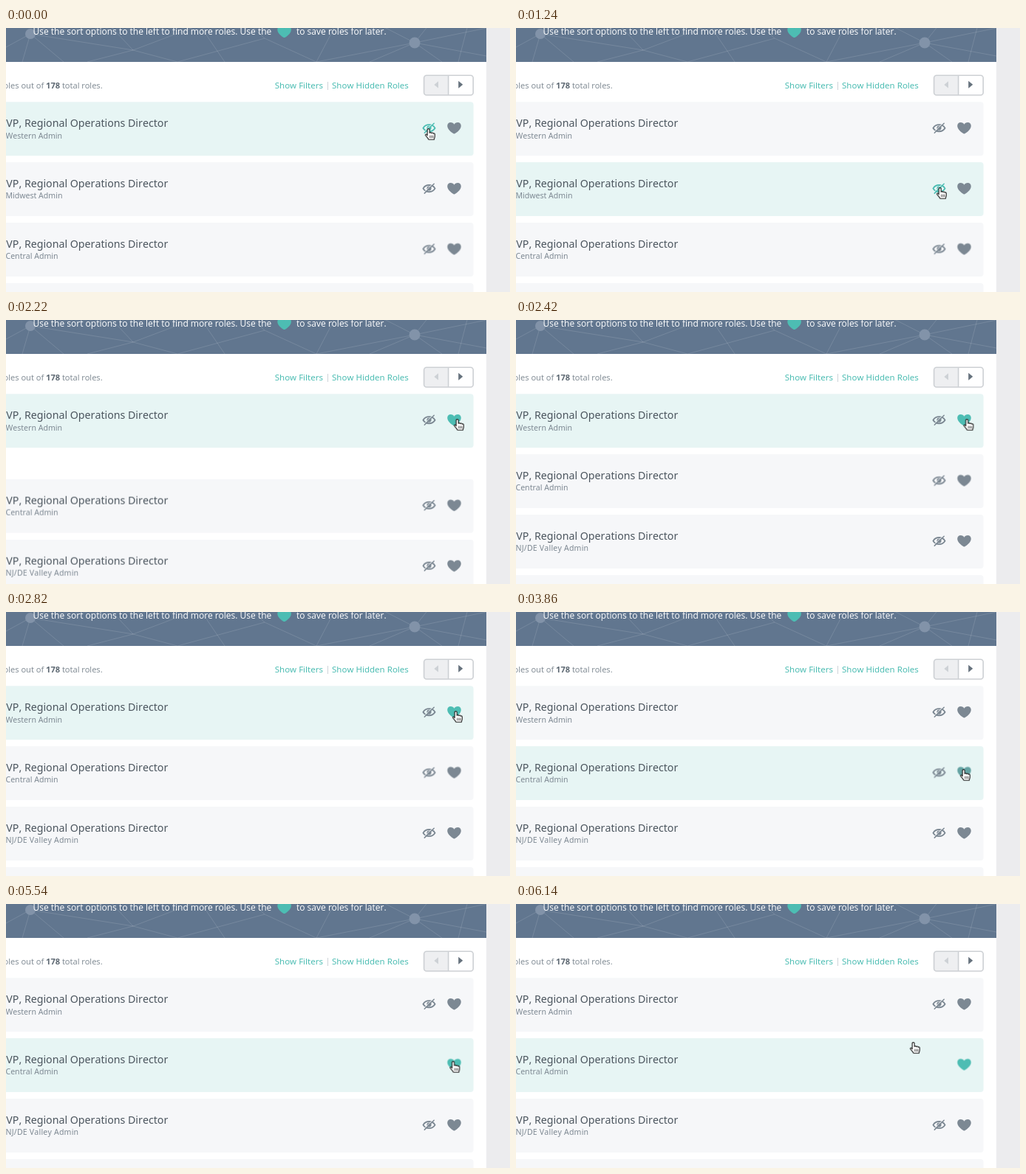
Animation of 682 by 358 pixels, one loop 6160 ms. Source, as an HTML page:

```html
<!DOCTYPE html>
<html lang="en">
<head>
<meta charset="utf-8">
<title>Role list</title>
<style>
:root { --teal: #4dbdb3; --gray: #7c8893; --row: #f6f7f9; --lit: #e7f5f4; }
html, body { margin: 0; width: 100%; height: 100%; overflow: hidden; background: #fff; }
svg { display: block; width: 682px; height: 358px; }

text { font-family: "Noto Sans", "Open Sans", sans-serif; font-kerning: none; }
.intro { font: 12.03px "Open Sans", sans-serif; fill: #fff; }
.count { font: 11.1px "Open Sans", sans-serif; fill: #7c8790; }
.count tspan { font-weight: 700; fill: #5d6872; }
.link { font-size: 11.52px; fill: var(--teal); }
.title { font-size: 14.2px; fill: #4b555e; }
.sub { font-size: 10.55px; fill: #7e8993; }
.card { fill: var(--row); }
.icon { color: var(--gray); }

.anim { animation: 6160ms ease-in-out infinite; }
.cursor { animation-name: cursor; }
.west-card { animation-name: west-card; }
.west-eye { animation-name: west-eye; }
.west-heart { animation-name: west-heart; }
.mid { animation-name: mid; }
.mid-card { animation-name: mid-card; }
.mid-eye { animation-name: mid-eye; }
.below { animation-name: below; }
.central-card { animation-name: central-card; }
.central-eye { animation-name: central-eye; }
.central-heart { animation-name: central-heart; }

@keyframes cursor {
  0%, 4.06% { transform: translate(571px, 138px); }
  14.61%, 25.32% { transform: translate(573px, 218px); }
  29.87% { transform: translate(603px, 131px); }
  33.77% { transform: translate(611px, 135px); }
  36.04% { transform: translate(610px, 136px); }
  45.78%, 53.57% { transform: translate(608px, 136px); }
  62.66%, 89.29% { transform: translate(605px, 215px); }
  99.68%, 100% { transform: translate(537px, 189px); }
}
@keyframes west-card {
  0%, 8.93% { fill: var(--lit); }
  10.88%, 27.68% { fill: var(--row); }
  29.63%, 57.87% { fill: var(--lit); }
  59.82%, 100% { fill: var(--row); }
}
@keyframes west-eye {
  0%, 6.17% { color: var(--teal); }
  8.12%, 100% { color: var(--gray); }
}
@keyframes west-heart {
  0%, 29.06% { color: var(--gray); }
  31.82%, 55.52% { color: var(--teal); }
  57.79%, 100% { color: var(--gray); }
}
@keyframes mid {
  0%, 26.95% { opacity: 1; }
  33.44%, 100% { opacity: 0; }
}
@keyframes mid-card {
  0%, 9.66% { fill: var(--row); }
  11.61%, 27.44% { fill: var(--lit); }
  30.84%, 100% { fill: var(--row); }
}
@keyframes mid-eye {
  0%, 12.34% { color: var(--gray); }
  14.29%, 100% { color: var(--teal); }
}
@keyframes below {
  0%, 32.47% { transform: none; }
  38.96%, 100% { transform: translateY(-82px); }
}
@keyframes central-card {
  0%, 58.6% { fill: var(--row); }
  60.55%, 100% { fill: var(--lit); }
}
@keyframes central-eye {
  0%, 78.57% { transform: scale(1); opacity: 1; }
  79.55% { transform: scale(.86); opacity: .95; }
  82.14%, 100% { transform: scale(0); opacity: 0; }
}
@keyframes central-heart {
  0%, 61.69% { color: var(--gray); transform: scale(1); }
  63.64%, 77.6% { color: var(--teal); transform: scale(1); }
  79.55% { color: var(--teal); transform: scale(1.2); }
  81.49% { color: var(--teal); transform: scale(1.36); }
  86.04%, 100% { color: var(--teal); transform: scale(1); }
}
</style>
</head>
<body>
<svg viewBox="0 0 682 358">
  <defs>
    <path id="heart" fill="currentColor" d="M0 7.9C-1.2 7.9-9.3 2.6-9.3-2.8C-9.3-5.8-7.3-7.5-4.8-7.5C-2.6-7.5-.9-6.4 0-4.8C.9-6.4 2.6-7.5 4.8-7.5C7.3-7.5 9.3-5.8 9.3-2.8C9.3 2.6 1.2 7.9 0 7.9Z"/>
    <mask id="cut" maskUnits="userSpaceOnUse" x="-11" y="-10" width="22" height="20">
      <path fill="#fff" d="M-11-10h22v20h-22z"/>
      <path stroke="#000" stroke-width="1" d="M-7 5.6 5.8-7.2"/>
    </mask>
    <g id="eye" fill="none" stroke="currentColor" stroke-linecap="round">
      <g mask="url(#cut)">
        <path stroke-width="1.9" d="M-8 .2C-4.5-5.9 4.5-5.9 8 .2C4.5 6.3-4.5 6.3-8 .2Z"/>
        <circle cy=".1" r="3.1" fill="currentColor" stroke="none"/>
      </g>
      <path stroke-width="1.5" d="M-6.2 6.7 6.7-6.2"/>
    </g>
    <rect id="card" x="-8" width="640.6" height="73" rx="4"/>
  </defs>

  <rect width="682" height="358" fill="#fff"/>
  <rect x="650" width="32" height="358" fill="#ececee"/>

  <rect width="650" height="46" fill="#61768f"/>
  <svg width="650" height="46">
    <g fill="none" stroke="#fff" stroke-opacity=".13">
      <path d="M33 8 0 26M33 8 78 46M33 8 22 46M33 8 62-4M33 8 172 30 262-4M110 46 172 30 232 46M172 30 140-4"/>
      <path d="M262-4 296 46M232 46 350 14 420 46M350 14 330-4M420 46 446-4M420 46 553 20"/>
      <path d="M553 20 506-4M553 20 492 46M553 20 572-4M553 20 590 46M553 20 650 0M553 20 650 38M625-4 612 46"/>
    </g>
    <g fill="#8293a9">
      <circle cx="33" cy="8" r="7"/>
      <circle cx="553" cy="20" r="7.5"/>
    </g>
  </svg>
  <text class="intro" x="36.5" y="9">Use the sort options to the left to find more roles. Use the</text>
  <use href="#heart" x="376.6" y="5.2" color="#4dbdb3"/>
  <text class="intro" x="393" y="9">to save roles for later.</text>

  <text class="count" x="-3.5" y="81.5">oles out of <tspan>178</tspan> total roles.</text>
  <text class="link" x="363.7" y="82.3">Show Filters</text>
  <path stroke="#cfd4d8" d="M435.5 73v11"/>
  <text class="link" x="441" y="82.3">Show Hidden Roles</text>

  <path fill="#eeeff1" d="M599 64.5H569a3.5 3.5 0 0 0-3.5 3.5v19.5a3.5 3.5 0 0 0 3.5 3.5h30z"/>
  <g fill="none" stroke="#cdd0d4" stroke-width="1.6">
    <rect x="565.6" y="64.2" width="66.6" height="26.8" rx="3.5"/>
    <path d="M598.6 64v27"/>
  </g>
  <path fill="#cdd1d5" d="M585 72.2v9.4l-5.6-4.7z"/>
  <path fill="#66727d" d="M612.2 71.8v10l6-5z"/>

  <g transform="translate(0 100.2)">
    <use href="#card" class="card anim west-card"/>
    <text class="title" x=".3" y="33.8">VP, Regional Operations Director</text>
    <text class="sub" x="-.5" y="49.4">Western Admin</text>
    <g transform="translate(572.5 35.3)"><use href="#eye" class="icon anim west-eye"/></g>
    <g transform="translate(606.5 35.4)"><use href="#heart" class="icon anim west-heart"/></g>
  </g>

  <g transform="translate(0 182.1)">
    <g class="anim mid">
      <use href="#card" class="card anim mid-card"/>
      <text class="title" x=".3" y="33.8">VP, Regional Operations Director</text>
      <text class="sub" x="-.5" y="49.4">Midwest Admin</text>
      <g transform="translate(572.5 35.3)"><use href="#eye" class="icon anim mid-eye"/></g>
      <use href="#heart" class="icon" x="606.5" y="35.4"/>
    </g>
  </g>

  <g class="anim below">
    <g transform="translate(0 264.1)">
      <use href="#card" class="card anim central-card"/>
      <text class="title" x=".3" y="33.8">VP, Regional Operations Director</text>
      <text class="sub" x="-.5" y="49.4">Central Admin</text>
      <g transform="translate(572.5 35.3)"><use href="#eye" class="icon anim central-eye"/></g>
      <g transform="translate(606.5 35.4)"><use href="#heart" class="icon anim central-heart"/></g>
    </g>
    <g transform="translate(0 346.1)">
      <use href="#card" class="card"/>
      <text class="title" x=".3" y="33.8">VP, Regional Operations Director</text>
      <text class="sub" x="-.5" y="49.4" letter-spacing=".2">NJ/DE Valley Admin</text>
      <use href="#eye" class="icon" x="572.5" y="35.3"/>
      <use href="#heart" class="icon" x="606.5" y="35.4"/>
    </g>
    <use href="#card" class="card" y="428.1"/>
  </g>

  <g class="anim cursor">
    <g transform="translate(.6 -1) scale(.95)" stroke="#222" stroke-linejoin="round" stroke-linecap="round">
      <path fill="#fff" stroke-width="1.2" d="M-1.6 9.2V1.2a1.6 1.6 0 0 1 3.2 0V5.6a1.5 1.4 0 0 1 2.8.4a1.4 1.4 0 0 1 2.6.6a1.3 1.3 0 0 1 2.1 1.2V10.5c0 1.6-1 2.3-1 4.5H.2C-.4 13-2.6 11.5-4 9.2C-4.8 7.8-3.2 6.8-2.3 8Z"/>
      <path fill="none" stroke-width=".8" d="M2.2 9.5v3M4.4 9.5v3M6.5 9.5v3"/>
    </g>
  </g>
</svg>
</body>
</html>
```
